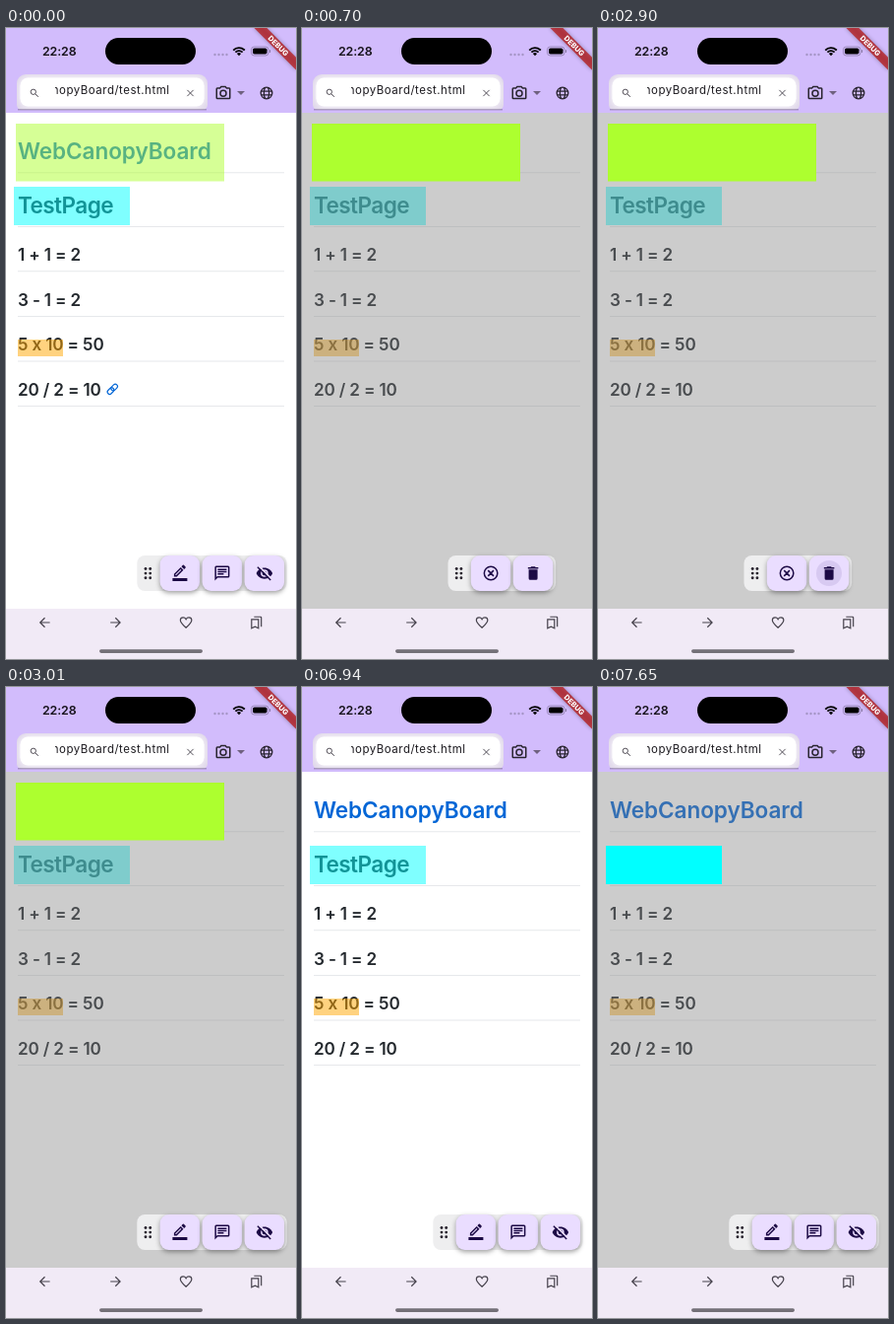
Recreate the animation shown at these times as an HTML page with a canvas. Size 295 by 640 pixels, loop 8 s.

```html
<!DOCTYPE html>
<html lang="en">
<head>
<meta charset="utf-8">
<title>Memory sheet demo</title>
<style>
html, body { margin: 0; width: 100%; height: 100%; overflow: hidden; background: #fff; }
canvas { display: block; width: 295px; height: 640px; }
</style>
</head>
<body>
<canvas id="stage"></canvas>
<script>
const W = 295, H = 640, LOOP = 8000;
const canvas = document.getElementById('stage');
const ctx = canvas.getContext('2d');
const dpr = window.devicePixelRatio || 1;
canvas.width = W * dpr;
canvas.height = H * dpr;

const LILAC = '#d2bcfc', BUTTON = '#eaddff', INK = '#1c0a45', DARK = '#24292e', NAV = '#46424c';
const SANS = 'Inter, "Open Sans", sans-serif';

// Icons live on a 24-unit grid; w is the stroke width, none means filled.
const ICONS = {
  search: { w: 2, d: 'M15 9.5A5.5 5.5 0 1 1 4 9.5A5.5 5.5 0 1 1 15 9.5M13.5 13.5L20 20' },
  close: { w: 2, d: 'M5.5 5.5L18.5 18.5M18.5 5.5L5.5 18.5' },
  camera: { w: 2, d: 'M4 6H7.4L9.2 4H14.8L16.6 6H20Q21 6 21 7V19Q21 20 20 20H4Q3 20 3 19V7Q3 6 4 6ZM16 13A4 4 0 1 1 8 13A4 4 0 1 1 16 13' },
  drop: { d: 'M6 9.5H18L12 15.5Z' },
  globe: { w: 2, d: 'M21 12A9 9 0 1 1 3 12A9 9 0 1 1 21 12M16 12A4 9 0 1 1 8 12A4 9 0 1 1 16 12M4 9H20M4 15H20' },
  back: { w: 1.9, d: 'M20 12H4.8M12 4.5L4.5 12L12 19.5' },
  next: { w: 1.9, d: 'M4 12H19.2M12 4.5L19.5 12L12 19.5' },
  heart: { w: 1.9, d: 'M12 20.3C5.4 14.5 3 12 3 8.5C3 5.6 5.2 4 7.5 4C9.4 4 11 5 12 6.8C13 5 14.6 4 16.5 4C18.8 4 21 5.6 21 8.5C21 12 18.6 14.5 12 20.3Z' },
  books: { w: 1.9, d: 'M4 7H15V21L9.5 18.6L4 21ZM8 3H18.5Q19.5 3 19.5 4V18.5' },
  pencil: { d: 'M2 20H22V24H2ZM13.06 5.19L16.81 8.94L7.75 18H4V14.25ZM6 16H6.9L14 8.94L13.06 8L6 15.1ZM17.8 7.94L14.06 4.2L15.9 2.36Q16.6 1.8 17.3 2.36L19.64 4.7Q20.2 5.4 19.64 6.1Z' },
  note: { d: 'M4 2H20Q22 2 22 4V16Q22 18 20 18H6L2 22V4Q2 2 4 2ZM4 4V17.2L5.2 16H20V4ZM6 12H14V14H6ZM6 9H18V11H6ZM6 6H18V8H6Z' },
  eye: { d: 'M1 12C2.7 7.6 7 4.5 12 4.5S21.3 7.6 23 12C21.3 16.4 17 19.5 12 19.5S2.7 16.4 1 12ZM17 12A5 5 0 1 0 7 12A5 5 0 1 0 17 12ZM15 12A3 3 0 1 0 9 12A3 3 0 1 0 15 12Z' },
  slash: { w: 1.9, d: 'M2.6 3.6L20.4 21.4' },
  gap: { w: 2.2, d: 'M4.6 2.4L22 19.8' },
  cancel: { w: 2, d: 'M21 12A9 9 0 1 1 3 12A9 9 0 1 1 21 12M8.2 8.2L15.8 15.8M15.8 8.2L8.2 15.8' },
  bin: { d: 'M6 7H18V19Q18 21 16 21H8Q6 21 6 19ZM5 4H8.5L9.5 3H14.5L15.5 4H19V6H5Z' }
};
for (const icon of Object.values(ICONS)) icon.path = new Path2D(icon.d);

function drawIcon(name, x, y, size, color) {
  const { w, path } = ICONS[name];
  ctx.save();
  ctx.translate(x, y);
  ctx.scale(size / 24, size / 24);
  ctx.translate(-12, -12);
  if (w) {
    ctx.lineWidth = w;
    ctx.strokeStyle = color;
    ctx.stroke(path);
  } else {
    ctx.fillStyle = color;
    ctx.fill(path, 'evenodd');
  }
  ctx.restore();
}

function rect(x, y, w, h, color, radius = 0) {
  ctx.fillStyle = color;
  ctx.beginPath();
  ctx.roundRect(x, y, w, h, radius);
  ctx.fill();
}

function dot(x, y, r, color) {
  ctx.fillStyle = color;
  ctx.beginPath();
  ctx.arc(x, y, r, 0, Math.PI * 2);
  ctx.fill();
}

function text(str, x, y, size, weight, color, spacing = 0, align = 'left') {
  ctx.font = `${weight} ${size}px ${SANS}`;
  ctx.letterSpacing = spacing + 'px';
  ctx.textAlign = align;
  ctx.fillStyle = color;
  ctx.fillText(str, x, y);
}

function shadow(color, blur, dy = 0) {
  ctx.shadowColor = color;
  ctx.shadowBlur = blur * dpr;
  ctx.shadowOffsetY = dy * dpr;
}

function statusBar() {
  text('22:28', 37, 28.3, 12.4, 600, '#17131c', -0.1);
  rect(101, 10, 92, 27, '#000', 13.5);
  for (let i = 0; i < 4; i++) dot(212.5 + i * 4, 27, 1.2, '#a595c6');

  ctx.strokeStyle = '#000';
  ctx.lineWidth = 1.9;
  for (const r of [4.9, 7.9]) {
    ctx.beginPath();
    ctx.arc(237, 28, r, -Math.PI * 0.76, -Math.PI * 0.24);
    ctx.stroke();
  }
  ctx.fillStyle = '#000';
  ctx.beginPath();
  ctx.moveTo(237, 28.3);
  ctx.arc(237, 28, 2.9, -Math.PI * 0.76, -Math.PI * 0.24);
  ctx.fill();

  ctx.lineWidth = 0.8;
  ctx.strokeStyle = '#8c7ca9';
  ctx.beginPath();
  ctx.roundRect(249.5, 19, 17.5, 9, 3);
  ctx.stroke();
  rect(251, 20.5, 14.5, 6, '#000', 1.7);
  rect(268, 22, 1.1, 3, '#8c7ca9', 0.6);
}

function searchBar() {
  ctx.save();
  ctx.beginPath();
  ctx.roundRect(11, 47, 194, 36, [9, 9, 5, 5]);
  ctx.clip();
  rect(11, 47, 194, 36, '#e0d8ea');
  shadow('#fff', 6);
  rect(14.5, 50.5, 187, 29, '#fff', 8);
  ctx.restore();
  rect(12, 82.5, 192, 0.8, '#77698c');

  drawIcon('search', 29, 66, 11.5, '#4a454f');
  drawIcon('close', 187.5, 66, 11.5, '#4a454f');
  ctx.save();
  ctx.beginPath();
  ctx.rect(50, 52, 120, 26);
  ctx.clip();
  text('CanopyBoard/test.html', 166.5, 67.3, 11.5, 400, '#1d1b20', 0.5, 'right');
  ctx.restore();

  drawIcon('camera', 221, 65.5, 18, '#29242f');
  drawIcon('drop', 239, 65.7, 16, '#6f617f');
  drawIcon('globe', 265, 66, 15.5, '#29242f');
}

function banner() {
  ctx.save();
  ctx.translate(W, 0);
  ctx.rotate(Math.PI / 4);
  shadow('rgba(0,0,0,.5)', 4.5);
  rect(-30, 21, 60, 9, 'rgba(183,28,28,.63)');
  shadow('transparent', 0);
  rect(-30, 21, 60, 9, 'rgba(183,28,28,.35)');
  text('DEBUG', 0, 28.2, 7.4, 800, '#fff', 0, 'center');
  ctx.restore();
}

function linkIcon() {
  ctx.save();
  ctx.translate(108.3, 366.3);
  ctx.rotate(-Math.PI / 4);
  ctx.strokeStyle = '#0366d6';
  ctx.lineWidth = 1.15;
  for (const x of [-6.3, -1.1]) {
    ctx.beginPath();
    ctx.roundRect(x, -2.3, 7.4, 4.6, 2.3);
    ctx.stroke();
  }
  ctx.restore();
}

function page(link) {
  rect(0, 86, W, 503, '#fff');
  for (const y of [146.3, 201, 246.3, 292, 337.5, 383]) rect(12, y, 271, 0.9, '#e6e8eb');
  text('WebCanopyBoard', 12, 133, 22.6, 600, '#0366d6', -0.1);
  text('TestPage', 12, 188, 22.6, 600, DARK, -0.6);
  const sums = ['1 + 1 = 2', '3 - 1 = 2', '5 x 10 = 50', '20 / 2 = 10'];
  sums.forEach((s, i) => text(s, 12, 236.2 + i * 45.6, 17.1, 600, DARK, -0.15));
  if (link) linkIcon();
}

function marker(box, rgb, alpha) {
  rect(...box, `rgba(${rgb},${alpha})`);
}
const GREEN = [[10, 97, 212, 58.5], '173,255,47'];
const CYAN = [[8, 161, 118, 39], '0,255,255'];
const AMBER = [[12, 316, 46, 17], '255,165,0'];

function button(x, icon, pressed) {
  ctx.save();
  shadow('rgba(0,0,0,.38)', 5, 2);
  rect(x, 535, 40.5, 36, BUTTON, 9);
  ctx.restore();
  if (pressed) dot(x + 20.2, 553, 13, 'rgba(79,55,139,.12)');
  const cx = x + 20.3;
  drawIcon(icon, cx, icon === 'pencil' ? 552 : 553, 18, INK);
  if (icon === 'eye') {
    drawIcon('gap', cx, 553, 18, BUTTON);
    drawIcon('slash', cx, 553, 18, INK);
  }
}

function toolbar(x, icons, pressed) {
  rect(x, 535, 24 + icons.length * 42.8, 36, '#eeeeef', 8);
  for (let i = 0; i < 6; i++) dot(x + 8.7 + (i % 2) * 4.7, 548.5 + (i >> 1) * 4.6, 1.45, '#29242f');
  icons.forEach((icon, i) => button(x + 23.3 + i * 43, icon, icon === pressed));
}

function bottomBar() {
  rect(0, 589, W, 51, '#f1eaf6');
  ['back', 'next', 'heart', 'books'].forEach((n, i) => drawIcon(n, 39.5 + i * 71.8, 603, 15.3, NAV));
  rect(95, 630.3, 105, 3.6, '#747078', 1.8);
}

function draw(t) {
  const firstHidden = t >= 700 && t < 6940;
  const secondHidden = t >= 7130;
  const editing = t >= 700 && t < 3010;

  ctx.setTransform(dpr, 0, 0, dpr, 0, 0);
  page(t < 500);
  if (t < 700) marker(...GREEN, 0.5);
  if (!secondHidden) marker(...CYAN, 0.5);
  marker(...AMBER, 0.5);

  if (firstHidden || secondHidden) rect(0, 86, W, 503, 'rgba(128,128,128,.4)');
  if (firstHidden) marker(...GREEN, 1);
  if (secondHidden) marker(...CYAN, 1);

  if (editing) toolbar(148.5, ['cancel', 'bin'], t >= 2900 ? 'bin' : '');
  else toolbar(133.3, ['pencil', 'note', 'eye']);

  rect(0, 0, W, 86, LILAC);
  statusBar();
  searchBar();
  bottomBar();
  banner();
}

const start = performance.now();
function tick() {
  draw((performance.now() - start) % LOOP);
  requestAnimationFrame(tick);
}
tick();
</script>
</body>
</html>
```
